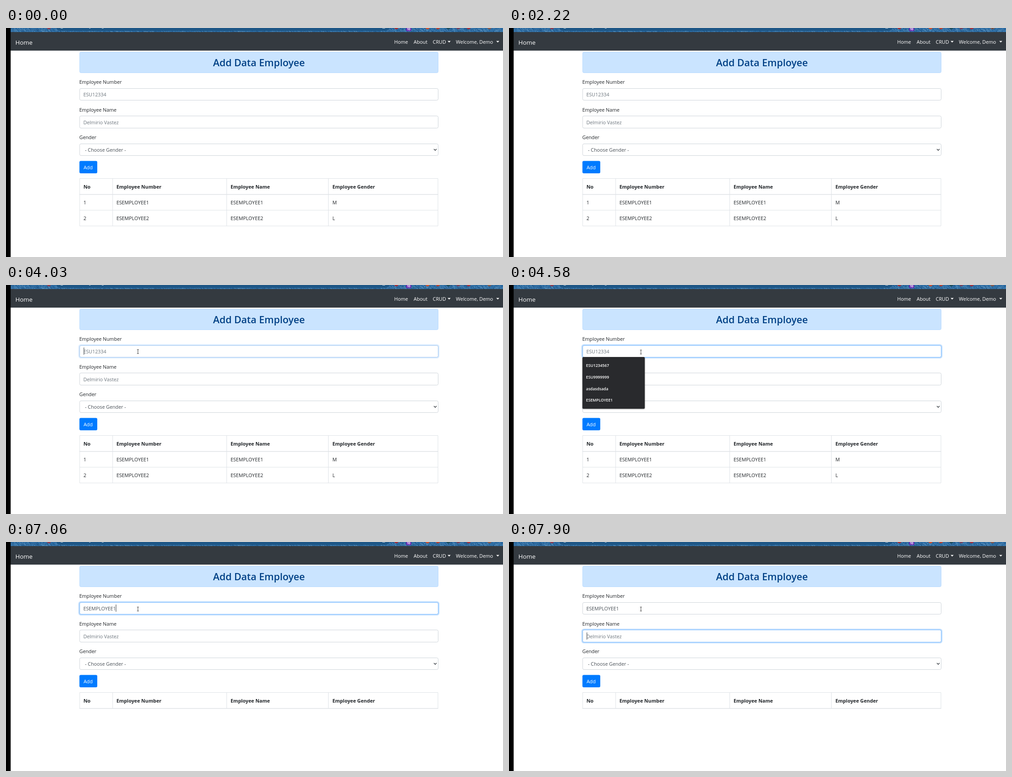
An HTML page for the animation above (8 s loop, 1100 by 509 pixels).

```html
<!DOCTYPE html>
<html lang="en">
<head>
<meta charset="utf-8">
<title>Add Data Employee</title>
<style>
  html, body { margin: 0; width: 100%; height: 100%; overflow: hidden; background: #fff; }
  svg { display: block; width: 100%; height: 100%; }
  text { font: 10.8px "Open Sans", "Noto Sans", sans-serif; fill: #212529; white-space: pre; }
  .nav text { fill: #fff; }
  .nav .brand { font-size: 13.4px; }
  .title { font-size: 21.6px; font-weight: 600; fill: #004085; text-anchor: middle; }
  .field { fill: #fff; stroke: #ced4da; }
  .ring rect { fill: none; stroke: #80bdff; }
  .ring .glow { stroke: #007bff; stroke-opacity: .25; stroke-width: 2.4; }
  .hint { fill: #6c757d; }
  .value { fill: #495057; }
  .bold { font-weight: 700; }
  .grid { fill: none; stroke: #dee2e6; }
  .popup rect { fill: #292a2d; filter: drop-shadow(0 1px 1px rgba(0, 0, 0, .4)); }
  .popup text { font-size: 8.7px; font-weight: 600; fill: #fff; }
  .caret { stroke: #343a40; }
  .badge { font-size: 6.5px; font-weight: 700; fill: #fff; }
</style>
</head>
<body>
<svg viewBox="0 0 1100 509" preserveAspectRatio="none">
  <rect width="1100" height="509" fill="#fff"/>

  <g id="browser">
    <rect width="1100" height="9" fill="#2c6ca3"/>
    <path id="darkWeave" stroke="#1c4f80" fill="none"/>
    <path id="lightWeave" stroke="#689cc4" stroke-width=".7" fill="none"/>
    <rect x="111" y="-16" width="738" height="22.5" rx="9" fill="#1d5686"/>
    <path d="M121 .5h5M184 .5h3M212 .5h4M833 .5h6" stroke="#b9cfe0"/>
    <g id="icons"></g>
    <rect x="885.5" y="-3" width="11.5" height="10" rx="2" fill="#6a2fb5"/>
    <text class="badge" x="887.4" y="4.8">10</text>
  </g>

  <g class="nav">
    <rect y="9" width="1100" height="41.3" fill="#343a40"/>
    <text class="brand" x="20.8" y="36.5">Home</text>
    <text x="859.3" y="35">Home</text>
    <text x="902.3" y="35">About</text>
    <text x="944.6" y="35">CRUD</text>
    <text x="995.8" y="35">Welcome, Demo</text>
    <path d="M977.4 28.8h6.8l-3.4 3.4zM1085 28.8h6.8l-3.4 3.4z" fill="#fff"/>
  </g>
  <rect width="10.3" height="509" fill="#000"/>

  <rect x="163" y="53.5" width="793.5" height="46" rx="3" fill="#cae4ff" stroke="#b8daff"/>
  <text class="title" x="559.8" y="85">Add Data Employee</text>

  <text x="162.3" y="124">Employee Number</text>
  <text x="162.3" y="185.5">Employee Name</text>
  <text x="162.3" y="247">Gender</text>
  <rect class="field" x="163" y="134.5" width="793.5" height="26" rx="3"/>
  <rect class="field" x="163" y="195.5" width="793.5" height="27" rx="3"/>
  <rect class="field" x="163" y="257.5" width="793.5" height="26" rx="3"/>
  <path d="M947 269l3 3 3-3" fill="none" stroke="#343a40" stroke-width="1.4"/>

  <g class="ring" id="numberRing">
    <rect class="glow" x="161.4" y="132.9" width="796.7" height="29.2" rx="4.5"/>
    <rect x="163" y="134.5" width="793.5" height="26" rx="3"/>
  </g>
  <g class="ring" id="nameRing">
    <rect class="glow" x="161.4" y="193.9" width="796.7" height="30.2" rx="4.5"/>
    <rect x="163" y="195.5" width="793.5" height="27" rx="3"/>
  </g>

  <rect id="selection" x="172" y="139" width="72" height="16" fill="#3390ff"/>
  <text id="number" x="171.2" y="152"></text>
  <text class="hint" x="171.2" y="213.5">Delmirio Vastez</text>
  <text class="value" x="174.8" y="275">- Choose Gender -</text>
  <path class="caret" id="caret"/>

  <rect x="162.5" y="295.5" width="39.5" height="27.5" rx="3" fill="#007bff"/>
  <text x="171.7" y="313.8" style="fill:#fff">Add</text>

  <path class="grid" d="M163 370V334.5H956V370M236 334.5V370M488.5 334.5V370M713.5 334.5V370"/>
  <path class="grid" d="M162.5 370H956.5" stroke-width="1.5"/>
  <g id="head"></g>
  <g id="rows">
    <path class="grid" d="M163 370V440H956V370M163 405H956M236 370V440M488.5 370V440M713.5 370V440"/>
  </g>

  <g class="popup" id="allHints"></g>
  <g class="popup" id="oneHint"></g>

  <path id="arrow" d="M0 0V9.2L2.1 7.3 3.5 10.3 4.9 9.7 3.6 6.8H6.4Z" fill="#fff" stroke="#000" stroke-width=".7"/>
  <path id="beam" d="M-2-4.5H-.5L0-4 .5-4.5H2M0-4V4M-2 4.5H-.5L0 4 .5 4.5H2" fill="none" stroke="#222" stroke-width=".9"/>
</svg>

<script>
const LOOP = 8000;
const el = id => document.getElementById(id);
const show = (id, on) => el(id).style.display = on ? '' : 'none';
const between = (t, ...spans) => spans.some(([a, b]) => t >= a && t < b);
const ramp = (t, a, b) => Math.min(1, Math.max(0, (t - a) / (b - a)));

// woven texture of the window frame
let seed = 7;
const random = () => (seed = (seed * 16807) % 2147483647) / 2147483647;
function weave(id, count) {
  let d = '';
  for (let i = 0; i < count; i++) {
    const length = 1 + random() * 2.5;
    d += `M${(10 + random() * 1090).toFixed(1)} ${(random() * 8).toFixed(1)}l${length.toFixed(1)} ${(length * .8).toFixed(1)}`;
  }
  el(id).setAttribute('d', d);
}
weave('darkWeave', 900);
weave('lightWeave', 1100);

el('icons').innerHTML = [
  [95, '#8e3b50'], [864, '#a32d35'], [933, '#d2502c'], [956, '#b8402f'],
  [979, '#1d4c58'], [1001, '#74405a'], [1024, '#a5303c'], [1070, '#8a5a4c']
].map(([x, color]) => `<circle cx="${x}" cy="-2" r="5" fill="${color}"/>`).join('');

// table text
const columns = [171.5, 244.4, 497, 722.4];
const tableRow = (cells, y, style = '') =>
  cells.map((cell, i) => `<text class="${style}" x="${columns[i]}" y="${y}">${cell}</text>`).join('');
el('head').innerHTML = tableRow(['No', 'Employee Number', 'Employee Name', 'Employee Gender'], 356.8, 'bold');
el('rows').innerHTML += tableRow(['1', 'ESEMPLOYEE1', 'ESEMPLOYEE1', 'M'], 392)
  + tableRow(['2', 'ESEMPLOYEE2', 'ESEMPLOYEE2', 'L'], 427);

const popup = items =>
  `<rect x="162.5" y="160" width="138" height="${11.5 + items.length * 25.9}" rx="2.5"/>` +
  items.map((item, i) => `<text x="170.6" y="${182 + i * 25.8}">${item}</text>`).join('');
el('allHints').innerHTML = popup(['ESU1234567', 'ESU9999999', 'asdasdsada', 'ESEMPLOYEE1']);
el('oneHint').innerHTML = popup(['ESEMPLOYEE1']);

// pointer stops, spread evenly from the first time to the second; the last one holds
const AWAY = [0, -50];
const strokes = [
  [0, 0, [AWAY]],
  [70, 610, [[1039, 490], [905, 420], [745, 345], [590, 270], [455, 205], [365, 162], [320, 138], [307, 131]]],
  [1140, 1840, [[305, 112], [303, 76], [303, 42], [335, 33], [440, 27], [590, 20], [750, 14], [900, 8], [1050, 1], AWAY]],
  [2140, 2300, [[1080, -8], [1070, -8], AWAY]],
  [2550, 2780, [[1067, -9], [1066, -8], [1067, -8], [1066, -8]]],
  [3410, 3872, [[985, 4], [820, 42], [640, 82], [475, 116], [362, 139], [308, 147], [292, 148]]],
  [4260, 4260, [[292, 149]]]
];
function pointerAt(t) {
  const [start, end, stops] = strokes.filter(s => t >= s[0]).pop();
  const last = stops.length - 1;
  const step = end > start ? Math.floor((t - start + 1) / (end - start) * last) : last;
  return stops[Math.min(last, step)];
}

function drawPointer(t) {
  const [x, y] = pointerAt(t);
  const overField = x > 163 && x < 957 && (between(y, [134, 161], [195, 223]));
  show('arrow', !overField);
  show('beam', overField);
  el(overField ? 'beam' : 'arrow').setAttribute('transform', `translate(${x} ${y})`);
}

function numberText(t) {
  if (t < 6140) return 'ESU12334';
  if (t < 6890) return 'ESEMPLOYEE2';
  return t < 7060 ? 'ESEMPLOYEE' : 'ESEMPLOYEE1';
}

function draw(t) {
  const selected = between(t, [7370, 7750]);
  el('number').textContent = numberText(t);
  el('number').setAttribute('class', t < 6140 ? 'hint' : 'value');
  el('number').style.fill = selected ? '#fff' : '';
  show('selection', selected);

  const leave = ramp(t, 7700, 7890) * (t >= 7750);
  el('numberRing').style.opacity = ramp(t, 3940, 4100) - leave;
  el('nameRing').style.opacity = leave;

  const atStart = between(t, [4030, 4580], [5130, 5680]);
  const atEnd = between(t, [6140, 6640], [7060, 7370]);
  const inName = t >= 7750;
  show('caret', atStart || atEnd || inName);
  el('caret').setAttribute('d', `M${atEnd ? 243.5 : 172.5} ${inName ? 201 : 139}v16`);

  show('allHints', between(t, [4100, 6140]));
  show('oneHint', between(t, [6890, 7060]));
  show('rows', t < 7060);
  drawPointer(t);
}

const begin = performance.now();
function tick() {
  draw((performance.now() - begin) % LOOP);
  requestAnimationFrame(tick);
}
tick();
</script>
</body>
</html>
```
